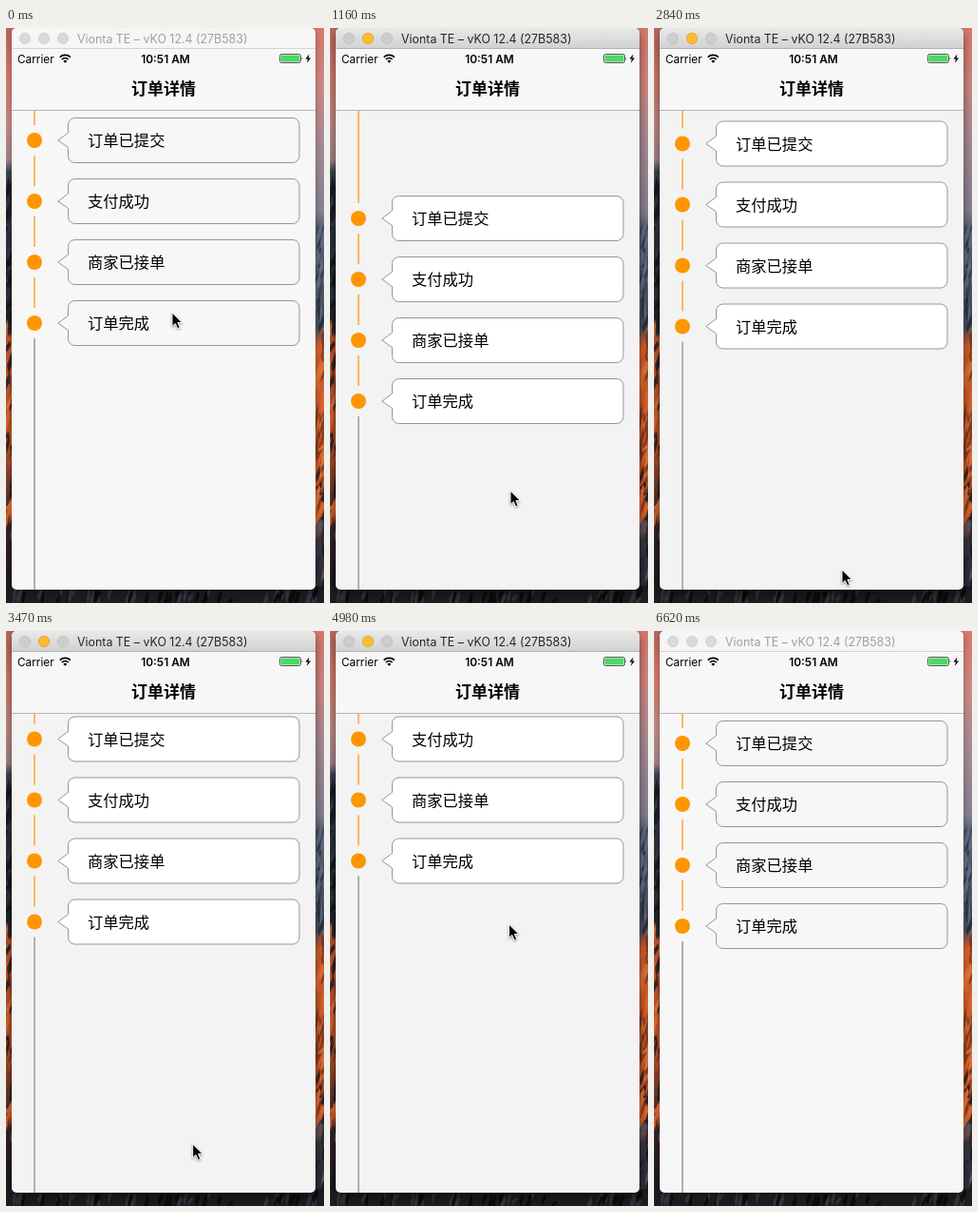
These frames come from a looping animation (335x604 px, 6720 ms). An HTML page:

```html
<!DOCTYPE html>
<html lang="zh-CN">
<head>
<meta charset="utf-8">
<style>
  html, body { margin: 0; width: 335px; height: 604px; overflow: hidden; }
  svg { display: block; }
  text { font-family: Inter, Roboto, 'Noto Sans CJK SC', 'Noto Sans CJK', sans-serif; }
  #shadow { filter: drop-shadow(0 3px 4px rgba(0,0,0,.3)); }
  .active #shadow { filter: drop-shadow(0 5px 6px rgba(0,0,0,.5)); }
  #page { fill: #f7f7f7; }
  .active #page { fill: #f3f3f3; }
  .card { fill: #f7f7f7; stroke: #969696; }
  .active .card { fill: #fff; }
  #bar { fill: #f6f6f6; }
  .active #bar { fill: url(#metal); }
  #edge { fill: #d3d3d3; }
  .active #edge { fill: #b1b1b1; }
  .light { fill: #dadada; stroke: #cecece; stroke-width: .8; }
  .active .light { fill: #cdcdcd; stroke: #bdbdbd; }
  .active .mid { fill: #fdbc2e; stroke: #dfa023; }
  #title { fill: #a0a0a0; }
  .active #title { fill: #262626; }
</style>
</head>
<body>
<svg id="stage" width="335" height="604" viewBox="0 0 335 604">
  <defs>
    <linearGradient id="metal" x2="0" y2="1">
      <stop stop-color="#e9e9e9"/><stop offset="1" stop-color="#d1d1d1"/>
    </linearGradient>
    <linearGradient id="left" x2="0" y2="1">
      <stop stop-color="#b9665d"/><stop offset=".08" stop-color="#d5796a"/>
      <stop offset=".17" stop-color="#c48a86"/><stop offset=".23" stop-color="#a5848c"/>
      <stop offset=".25" stop-color="#3c4250"/><stop offset=".42" stop-color="#23262f"/>
      <stop offset=".51" stop-color="#25232a"/><stop offset=".53" stop-color="#c2582c"/>
      <stop offset=".73" stop-color="#b5502a"/><stop offset=".85" stop-color="#3a2628"/>
      <stop offset="1" stop-color="#15141a"/>
    </linearGradient>
    <linearGradient id="right" x2="0" y2="1">
      <stop stop-color="#d9786c"/><stop offset=".1" stop-color="#d08a84"/>
      <stop offset=".2" stop-color="#a78c97"/><stop offset=".32" stop-color="#87818f"/>
      <stop offset=".35" stop-color="#566073"/><stop offset=".52" stop-color="#4a5262"/>
      <stop offset=".55" stop-color="#cf5f2d"/><stop offset=".86" stop-color="#c2552a"/>
      <stop offset=".89" stop-color="#383641"/><stop offset="1" stop-color="#2a2932"/>
    </linearGradient>
    <clipPath id="frame"><path d="M6 5a5 5 0 0 1 5-5H321a5 5 0 0 1 5 5V585a5 5 0 0 1-5 5H11a5 5 0 0 1-5-5Z"/></clipPath>
    <clipPath id="view"><rect x="6" y="87" width="320" height="503"/></clipPath>
  </defs>

  <rect width="168" height="604" fill="url(#left)"/>
  <rect x="168" width="167" height="604" fill="url(#right)"/>
  <rect y="586" width="335" height="18" fill="#1d1c22"/>
  <g id="flecks"></g>

  <rect id="shadow" x="6" width="320" height="590" rx="5"/>
  <g clip-path="url(#frame)">
    <rect id="page" x="6" width="320" height="590"/>
    <g clip-path="url(#view)"><g id="list"></g></g>

    <rect x="6" y="22" width="320" height="64" fill="#f7f7f7"/>
    <rect x="6" y="86" width="320" height="1" fill="#b6b6b6"/>
    <text x="166" y="70" text-anchor="middle" font-size="17" font-weight="600">订单详情</text>

    <text x="12" y="36.5" font-size="11.8">Carrier</text>
    <g fill="none" stroke="#000" stroke-width="1.7">
      <path d="M56.7 30.6a8.1 8.1 0 0 1 11.2 0M58.9 33a5 5 0 0 1 6.8 0"/>
      <path d="M62.3 36.8l-2-2.1a2.9 2.9 0 0 1 4 0Z" fill="#000" stroke="none"/>
    </g>
    <text x="168" y="36.5" text-anchor="middle" font-size="11.9" font-weight="600">10:51 AM</text>
    <rect x="288.5" y="27.5" width="22" height="9" rx="1.8" fill="none" stroke="#333" stroke-width=".8"/>
    <rect x="289.5" y="28.5" width="20" height="7" rx=".8" fill="#4cd964"/>
    <path d="M311.6 30.3q1.6 1.7 0 3.4Z" fill="#333"/>
    <path d="M319.4 27.5l-4 5.1h2.5l-1 4.2 4.2-5.3h-2.6Z"/>

    <rect id="bar" x="6" width="320" height="22"/>
    <rect id="edge" x="6" y="21" width="320" height="1"/>
    <circle class="light" cx="20" cy="11" r="5.7"/>
    <circle class="light mid" cx="40" cy="11" r="5.7"/>
    <circle class="light" cx="60" cy="11" r="5.7"/>
    <text id="title" x="75" y="15.6" font-size="12.4">Vionta TE – vKO 12.4 (27B583)</text>
  </g>

  <g id="cursor">
    <path d="M0 0V14.5L3.3 11.4 5.7 16.8 8.2 15.7 5.9 10.4H10.4Z" stroke="#fff" stroke-width="1"
      style="filter:drop-shadow(0 1px 1px rgba(0,0,0,.4))"/>
  </g>
</svg>

<script>
const $ = id => document.getElementById(id);
const LOOP = 6720, ORANGE = '#ff9500', ROW = 64, FIRST = 118;

// Wallpaper brush strokes along the visible edges
let seed = 7;
const rnd = () => (seed = seed * 16807 % 2147483647) / 2147483647;
const pick = list => list[Math.floor(rnd() * list.length)];
function fleck(x, y, tones) {
  const w = 2 + rnd() * 4, h = 4 + rnd() * 14;
  return `<path d="M${x} ${y}l${w} ${-h}l1 ${h * .7}l${-w} ${h}Z" fill="${pick(tones)}" opacity=".85"/>`;
}
let flecks = '';
for (let i = 0; i < 170; i++) {
  const onLeft = rnd() < .42;
  const y = (onLeft ? 160 : 205) + rnd() * 385;
  const tones = y < 318 ? (onLeft ? ['#14161c', '#363c4a', '#1d212b'] : ['#272d3a', '#66718a', '#3c4454'])
    : y < 520 ? ['#e0672e', '#1f1c23', '#7d3820', '#e5753c']
    : ['#15151c', '#5a5560', '#282631'];
  flecks += fleck(onLeft ? rnd() * 7 - 2 : 325 + rnd() * 9, y, tones);
}
for (let i = 0; i < 50; i++) flecks += fleck(rnd() * 335, 594 + rnd() * 10, ['#08080b', '#3a3841']);
$('flecks').innerHTML = flecks;

// Timeline rows
const line = (from, to, color) =>
  `<rect x="29" y="${from}" width="2" height="${to - from}" fill="${color}"/>`;
$('list').innerHTML = ['订单已提交', '支付成功', '商家已接单', '订单完成'].map((label, i) => {
  const y = FIRST + i * ROW;
  return line(i ? y - 48 : -100, y - 16, '#ffb761') +
    `<circle cx="30" cy="${y}" r="8" fill="${ORANGE}"/>
     <path class="card" d="M65.5 ${y - 8}V${y - 16.5}a7 7 0 0 1 7-7H302a7 7 0 0 1 7 7V${y + 16.5}a7 7 0 0 1-7 7H72.5a7 7 0 0 1-7-7V${y + 7.5}L54.8 ${y}Z"/>
     <text x="86" y="${y + 6}" font-size="16.3">${label}</text>`;
}).join('') + line(FIRST + 3 * ROW + 16, 800, '#b0b0b0');

// The screen refreshes only in these spans: start, end, number of steps
const spans = [[630, 1250, 8], [1340, 1690, 5], [2490, 3110, 8], [3290, 3910, 8],
  [4000, 4170, 3], [4980, 5600, 8], [5690, 5690, 1], [6620, 6620, 1]];
function refreshTime(t) {
  let shown = 0;
  for (const [start, end, n] of spans) {
    if (t < start) break;
    const step = (end - start) / (n - 1) || 1;
    shown = start + step * Math.min(n - 1, Math.floor((t - start) / step + .05));
  }
  return shown;
}

// Pointer path: time, x, y
const path = [[630, 175, 299], [720, 176, 307], [810, 178, 335], [1070, 188, 460],
  [1160, 190, 486], [1250, 191, 497], [1430, 195, 533], [1600, 197.5, 564], [1690, 198, 569],
  [3200, 198, 569], [3380, 197.5, 556], [3640, 195, 505], [3910, 192.5, 410],
  [4090, 189.5, 325], [4170, 188.5, 308], [4980, 188.5, 308], [5160, 203, 345],
  [5420, 275, 500], [5600, 322, 590]];
function pointer(t) {
  if (t <= path[0][0]) return path[0].slice(1);
  const i = path.findIndex(p => p[0] >= t);
  if (i < 0) return path.at(-1).slice(1);
  const [a, b] = [path[i - 1], path[i]];
  const k = (t - a[0]) / (b[0] - a[0]);
  return [1, 2].map(j => a[j] + (b[j] - a[j]) * k);
}

// Rubber-band resistance while dragging, critically damped return on release
const HEIGHT = 568;
const rubber = d => HEIGHT * (1 - 1 / (Math.max(0, d) * .55 / HEIGHT + 1));
const settle = ms => { const u = ms * .0126; return (1 + u) * Math.exp(-u); };
const pullDown = t => rubber(pointer(t)[1] - 312);
const pullUp = t => -rubber(547.5 - pointer(t)[1]);
function scroll(t) {
  if (t < 630 || t >= 5600) return 0;
  if (t < 2420) return pullDown(t);
  if (t < 3200) return pullDown(2420) * settle(t - 2420);
  if (t < 4880) return pullUp(t);
  return pullUp(4880) * settle(t - 4880);
}

function draw(now) {
  const t = refreshTime(now % LOOP);
  const [x, y] = pointer(t);
  $('stage').setAttribute('class', t >= 630 && t < 6620 ? 'active' : '');
  $('list').setAttribute('transform', `translate(0 ${Math.round(scroll(t) * 2) / 2})`);
  $('cursor').setAttribute('transform', `translate(${x} ${y})`);
  $('cursor').setAttribute('visibility', t < 5690 ? 'visible' : 'hidden');
}
const begin = performance.now();
(function frame() {
  draw(performance.now() - begin);
  requestAnimationFrame(frame);
})();
</script>
</body>
</html>
```
